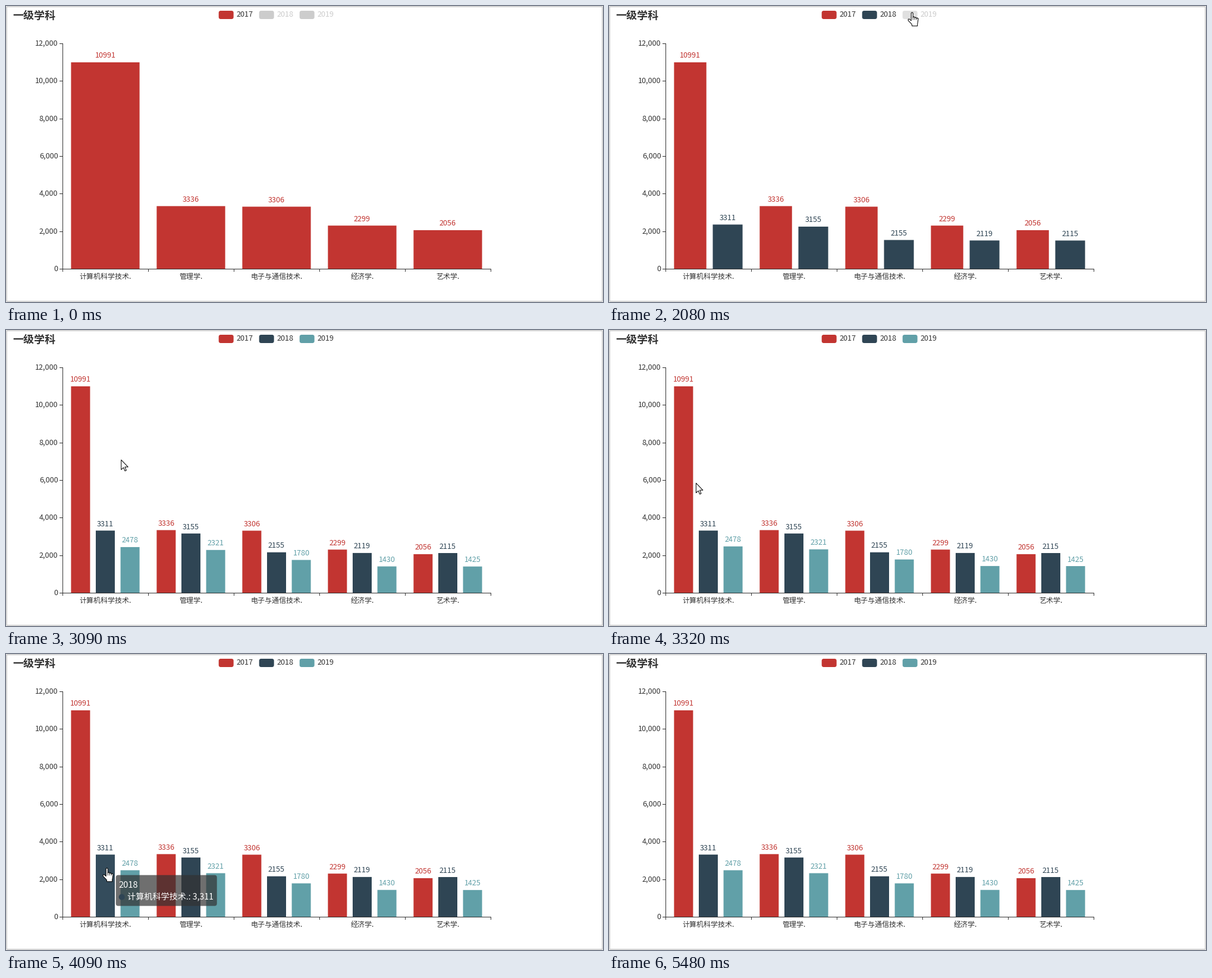
A matplotlib script for the animation above (5860 ms loop, 1004 by 499 pixels).

```python
import numpy as np
import matplotlib.pyplot as plt
from matplotlib.animation import FuncAnimation
from matplotlib.patches import Circle, FancyBboxPatch, Polygon, Rectangle

W, H, DPI = 1004, 499, 64
LOOP, STEP = 5860, 20
PT = 72 / DPI  # points per pixel

LEFT, BASE, BAND, PLOT_H, Y_MAX = 95, 443, 144, 380, 12000
GROUP_W = BAND * 0.8
KEY_X, KEY_GAP = 357.7, 68
INK, OFF = "#333333", "#cccccc"
COLORS = ["#c23531", "#2f4554", "#61a0a8"]
YEARS = ["2017", "2018", "2019"]
SUBJECTS = ["计算机科学技术.", "管理学.", "电子与通信技术.", "经济学.", "艺术学."]
VALUES = [
    [10991, 3336, 3306, 2299, 2056],
    [3311, 3155, 2155, 2119, 2115],
    [2478, 2321, 1780, 1430, 1425],
]
BORN = [-1000, 1878, 2490]  # when each series is switched on

# The screen refreshes at a fixed rate once the pointer shows up
ENTER, LEAVE, REFRESH = 190, 5470, 77.8
LEGEND_AWAKE = 1740  # the legend reacts to the pointer from here on
TIP_LAG = 140  # the tooltip trails the pointer

# Pointer stops: time, x, y
PATH = np.array([
    (ENTER, 262, 398), (740, 427, 33), (1200, 436, 14), (1900, 436, 14),
    (2050, 508, 11), (2650, 508, 11), (3060, 195, 217), (3400, 126, 274),
    (3600, 126, 274), (3690, 151, 318), (4000, 168, 361), (4330, 168, 361),
    (4610, 218, 402), (5320, 218, 402), (5480, 160, 510),
])

ARROW = np.array([(0, 0), (0, 16.5), (3.8, 13), (6.3, 18.7), (8.6, 17.7),
                  (6.2, 12), (11.5, 12)]) + 0.5
FINGER_TOPS = (0, 7.2, 8.2, 9.4)
fingers = [(3 * k + dx, top + abs(dx - 1.5) * 0.8)
           for k, top in enumerate(FINGER_TOPS) for dx in (0, 1.5, 3)]
wrist = [(10.5, 20), (10.5, 23), (1.5, 23), (1, 20)]
thumb = [(-5, 13.8), (-5, 11.5), (-3, 11.3), (0, 14)]
HAND = np.array(fingers + wrist + thumb) + (0.2, -0.3)


def ease_out_cubic(k):
    return 1 - (1 - np.clip(k, 0, 1)) ** 3


def ease_out_expo(k):
    return 1.0 if k >= 1 else 1 - 2 ** (-10 * max(0, k))


def lift(color):
    rgb = [int(color[i:i + 2], 16) / 255 for i in (1, 3, 5)]
    return tuple(min(1, c * 1.1) for c in rgb)


def slot(i, n):
    """Offset and width of series i when n series share a band."""
    w = GROUP_W / (1.3 * n - 0.3)
    return np.array([1.3 * w * i, w])


def bar_rect(i, c, t):
    pos = slot(i, i + 1)
    for n in range(i + 2, 4):
        pos = pos + ease_out_cubic((t - BORN[n - 1]) / 300) * (slot(i, n) - pos)
    h = VALUES[i][c] / Y_MAX * PLOT_H * ease_out_expo((t - BORN[i]) / 1000)
    x = LEFT + c * BAND + (BAND - GROUP_W) / 2 + pos[0]
    return x, BASE - h, pos[1], h


def pointer_at(t):
    return np.array([np.interp(t, PATH[:, 0], PATH[:, k]) for k in (1, 2)])


def hit(t):
    """Item under the pointer as (kind, series), or None."""
    px, py = pointer_at(t)
    for i in range(3):
        if t > LEGEND_AWAKE and 8 <= py <= 22 and 0 <= px - KEY_X - KEY_GAP * i <= 58:
            return "legend", i
        x, y, w, h = bar_rect(i, 0, t)
        if t >= BORN[i] and x <= px <= x + w and y <= py <= y + h:
            return "bar", i
    return None


plt.rcParams["font.family"] = ["Noto Sans CJK JP", "DejaVu Sans"]
fig = plt.figure(figsize=(W / DPI, H / DPI), dpi=DPI, facecolor="white")
ax = fig.add_axes([0, 0, 1, 1])
ax.set_xlim(0, W)
ax.set_ylim(H, 0)
ax.axis("off")


def text(x, y, s, size=12.6, color=INK, ha="left", z=5, **kw):
    return ax.text(x, y, s, fontsize=size * PT, color=color, ha=ha,
                   va="baseline", zorder=z, **kw)


def line(xs, ys):
    ax.plot(xs, ys, color=INK, lw=PT, zorder=3, solid_capstyle="butt", snap=False)


def rounded(x, y, w, h, r, z, **kw):
    box = FancyBboxPatch((x, y), w, h, zorder=z, lw=0,
                         boxstyle=f"round,pad=0,rounding_size={r}", **kw)
    return ax.add_patch(box)


# Frame, title and axes
ax.add_patch(Rectangle((1.2, 1.2), W - 2.4, H - 2.4, fill=False, ec="#cbcbcb",
                       lw=1.6 * PT, snap=False))
text(11.5, 22, "一级学科", 18, weight="bold")
line([LEFT + 0.5] * 2, [BASE - PLOT_H, BASE + 1])
line([LEFT, LEFT + 5 * BAND + 1], [BASE + 0.5] * 2)
for v in range(0, Y_MAX + 1, 2000):
    y = BASE - v / Y_MAX * PLOT_H
    line([LEFT - 5, LEFT], [round(y) + 0.5] * 2)
    text(87.5, y + 3.6, f"{v:,}", ha="right")
for c in range(6):
    line([LEFT + c * BAND + 0.5] * 2, [BASE, BASE + 5])
for c, name in enumerate(SUBJECTS):
    text(LEFT + (c + 0.5) * BAND, 460, name, 12, ha="center")

# Legend, bars and value labels
keys, key_texts, bars, labels = [], [], [], []
for i, year in enumerate(YEARS):
    x = KEY_X + KEY_GAP * i
    keys.append(rounded(x, 8, 25, 14, 3.5, 4))
    key_texts.append(text(x + 30, 18.4, year))
    bars.append([ax.add_patch(Rectangle((0, BASE), 0, 0, lw=0, zorder=2, snap=False))
                 for _ in SUBJECTS])
    labels.append([text(0, 0, str(v), color=COLORS[i], ha="center") for v in VALUES[i]])

# Tooltip and pointers
tip_box = rounded(0, 0, 178, 52, 4, 8, fc="#323232", alpha=0.7)
tip_dot = ax.add_patch(Circle((0, 0), 5, lw=0, zorder=9))
tip_head = text(0, 0, "", 14.6, "white", z=9)
tip_body = text(0, 0, "", 14.1, "white", z=9)
tip_parts = [tip_box, tip_dot, tip_head, tip_body]


def pointer(points):
    return ax.add_patch(Polygon(points, closed=True, fc="white", ec="black",
                                lw=PT, zorder=12, joinstyle="round"))


arrow, hand = pointer(ARROW), pointer(HAND)
knuckles = [ax.plot([], [], color="black", lw=0.8 * PT, zorder=13, snap=False)[0]
            for _ in FINGER_TOPS[1:]]


def draw_series(i, t, hover):
    on = t >= BORN[i]
    base = COLORS[i] if on else OFF
    keys[i].set_facecolor(lift(base) if hover == ("legend", i) else base)
    key_texts[i].set_color(INK if on else OFF)
    for c, (bar, label) in enumerate(zip(bars[i], labels[i])):
        x, y, w, h = bar_rect(i, c, t)
        bar.set_bounds(x, y, w, h)
        bar.set_facecolor(lift(base) if c == 0 and hover == ("bar", i) else base)
        label.set_position((x + w / 2, y - 7.5))
        bar.set_visible(on)
        label.set_visible(on)


def draw_tip(t, hover):
    item = hover or hit(t - TIP_LAG)
    shown = t < LEAVE and item is not None and item[0] == "bar"
    for part in tip_parts:
        part.set_visible(shown)
    if not shown:
        return
    i = item[1]
    x, y = pointer_at(t - TIP_LAG) + 20
    value = f"{VALUES[i][0]:,}"
    tip_box.set_bounds(x, y, 130 + 8 * len(value), 52)
    tip_dot.set_center((x + 10, y + 37))
    tip_dot.set_facecolor(COLORS[i])
    tip_head.set_position((x + 5, y + 21))
    tip_head.set_text(YEARS[i])
    tip_body.set_position((x + 19.5, y + 42))
    tip_body.set_text(f"{SUBJECTS[0]}: {value}")


def draw_pointer(t, hovering):
    shown = ENTER <= t < LEAVE
    x, y = at = pointer_at(t)
    arrow.set_xy(ARROW + at)
    hand.set_xy(HAND + at)
    arrow.set_visible(shown and not hovering)
    hand.set_visible(shown and hovering)
    for k, knuckle in enumerate(knuckles, 1):
        knuckle.set_data([x + 3 * k + 0.2] * 2, [y + FINGER_TOPS[k] + 0.7, y + 12])
        knuckle.set_visible(shown and hovering)


def update(frame):
    now = frame * STEP + STEP / 2
    t = ENTER + (now - ENTER) // REFRESH * REFRESH if now >= ENTER else 0
    hover = hit(t)
    for i in range(3):
        draw_series(i, t, hover)
    draw_tip(t, hover)
    draw_pointer(t, hover is not None)
    return []


anim = FuncAnimation(fig, update, frames=LOOP // STEP, init_func=lambda: update(0),
                     interval=STEP, repeat=True, repeat_delay=0, blit=False)
plt.show()
```
